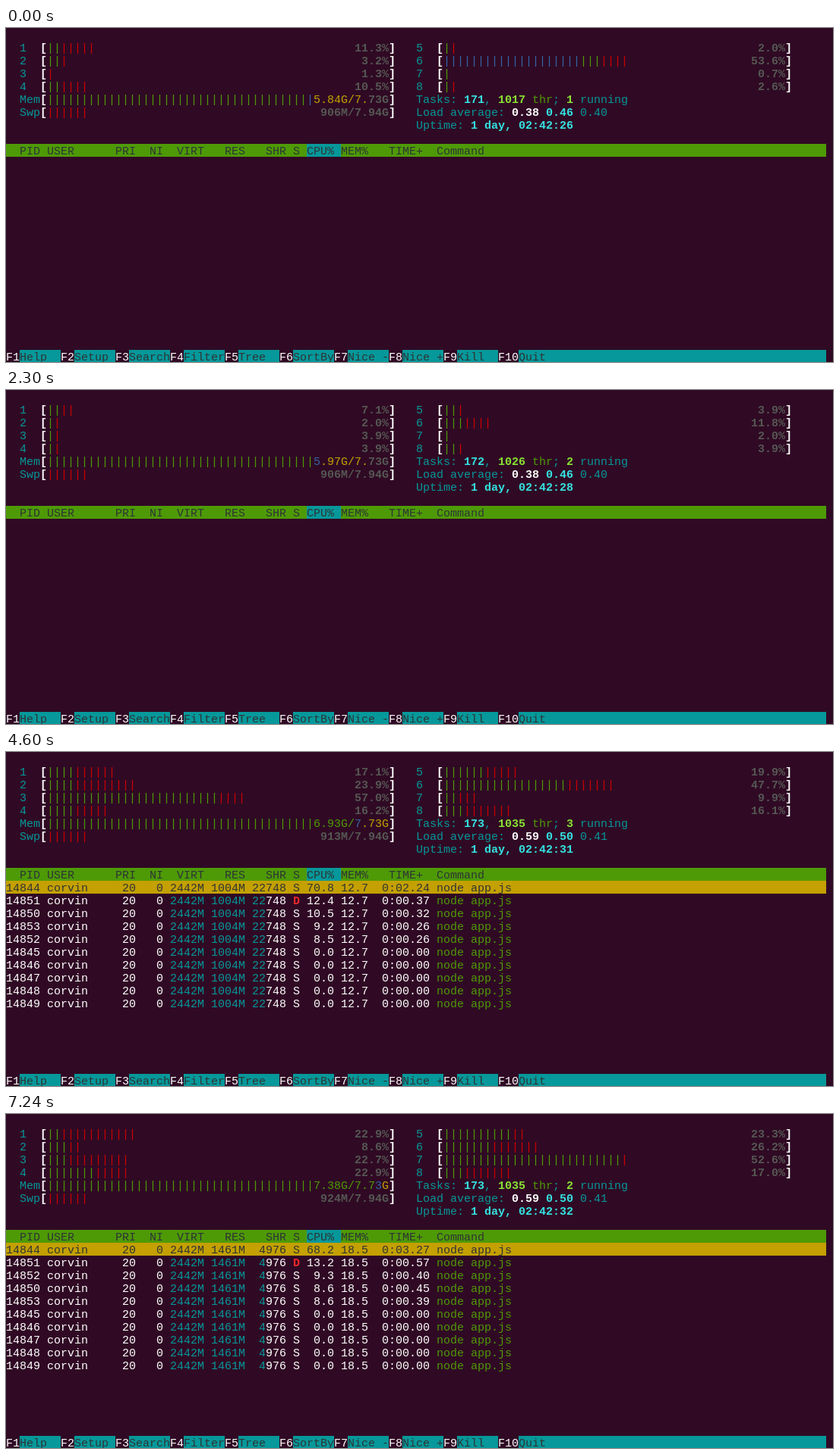
Animation of 1089 by 441 pixels, one loop 8000 ms. Source, as an HTML page:

```html
<!DOCTYPE html>
<html lang="en">
<head>
<meta charset="utf-8">
<title>Process monitor</title>
<style>
  html, body { margin: 0; width: 100%; height: 100%; overflow: hidden; background: #300a24; }
  #screen {
    position: relative; width: 1089px; height: 441px; overflow: hidden; color: #fff;
    font: 15px/0 "Liberation Mono", monospace; letter-spacing: calc(9px - 1ch);
    font-variant-ligatures: none; white-space: pre;
  }
  .t { position: absolute; height: 17px; }
  /* Strut that puts the baseline 14px below the top of the cell. */
  .t::before { content: ""; display: inline-block; height: 14px; }
  .g { color: #4e9a06; }
  .r { color: #c00; }
  .b { color: #3465a4; }
  .y { color: #c4a000; }
  .c { color: #06989a; }
  .dim, .C, .G, .R, .W { font-weight: bold; }
  .dim { color: #555753; }
  .C { color: #34e2e2; }
  .G { color: #8ae234; }
  .R { color: #ef2929; }
  .W { color: #fff; }
  .head, .pick, .key { color: #2e3436; }
  .head { background: #4e9a06; }
  .pick { background: #c4a000; }
  .key { background: #06989a; }
</style>
</head>
<body>
<div id="screen"></div>
<script>
const screen = document.getElementById('screen');
const CELL_W = 9, CELL_H = 17, COLS = 120, METER = 50;

// cpu: [percent, green bars, red bars, blue bars]; mem: [value, green, blue, yellow cells]
const scenes = [
  { until: 1400, mem: ['5.84G', 38, 1, 8], swap: '906M', tasks: [171, 1017, 1],
    load: ['0.38', '0.46', '0.40'], sec: 26,
    cpu: [['11.3', 2, 5], ['3.2', 2, 1], ['1.3', 0, 1], ['10.5', 2, 4],
          ['2.0', 1, 1], ['53.6', 3, 4, 20], ['0.7', 1, 0], ['2.6', 1, 1]] },
  { until: 2900, mem: ['5.97G', 39, 1, 7], swap: '906M', tasks: [172, 1026, 2],
    load: ['0.38', '0.46', '0.40'], sec: 28,
    cpu: [['7.1', 2, 2], ['2.0', 1, 1], ['3.9', 1, 1], ['3.9', 1, 1],
          ['3.9', 2, 1], ['11.8', 3, 4], ['2.0', 1, 0], ['3.9', 2, 1]] },
  { until: 4600, mem: ['6.44G', 42, 1, 7], swap: '906M', tasks: [173, 1034, 4],
    load: ['0.38', '0.46', '0.40'], sec: 29,
    cpu: [['21.9', 5, 7], ['13.0', 3, 4], ['9.3', 3, 3], ['14.5', 4, 4],
          ['9.2', 2, 3, 1], ['48.3', 18, 7], ['8.6', 2, 3], ['8.6', 3, 2]] },
  { until: 6100, mem: ['6.93G', 45, 1, 4], swap: '913M', tasks: [173, 1035, 3],
    load: ['0.59', '0.50', '0.41'], sec: 31,
    cpu: [['17.1', 4, 6], ['23.9', 4, 9], ['57.0', 25, 4], ['16.2', 4, 5],
          ['19.9', 6, 5], ['47.7', 18, 7], ['9.9', 2, 3], ['16.1', 3, 7]],
    res: '1004M', shr: '22748', share: '12.7',
    busy: [[44, '70.8', '2.24'], [51, '12.4', '0.37'], [50, '10.5', '0.32'],
           [53, '9.2', '0.26'], [52, '8.5', '0.26']] },
  { until: 8000, mem: ['7.38G', 48, 1, 1], swap: '924M', tasks: [173, 1035, 2],
    load: ['0.59', '0.50', '0.41'], sec: 32,
    cpu: [['22.9', 2, 11], ['8.6', 3, 2], ['22.7', 3, 9], ['22.9', 7, 5],
          ['23.3', 10, 2], ['26.2', 7, 7], ['52.6', 26, 1], ['17.0', 3, 7]],
    res: '1461M', shr: '4976', share: '18.5',
    busy: [[44, '68.2', '3.27'], [51, '13.2', '0.57'], [52, '9.3', '0.40'],
           [50, '8.6', '0.45'], [53, '8.6', '0.39']] },
];
const idle = [45, 46, 47, 48, 49].map(id => [id, '0.0', '0.00']);
const keys = ['Help', 'Setup', 'Search', 'Filter', 'Tree', 'SortBy', 'Nice -', 'Nice +', 'Kill', 'Quit'];

const span = (cls, text) => `<span class="${cls}">${text}</span>`;
const at = (col, row, html, cls = '') =>
  `<div class="t ${cls}" style="left:${col * CELL_W}px;top:${row * CELL_H}px">${html}</div>`;

// Colours successive runs of cells; parts are [class, cell count].
function paint(cells, parts) {
  let pos = 0;
  return parts.map(([cls, n]) => span(cls, cells.slice(pos, pos += n))).join('');
}

function meter(col, row, label, value, parts) {
  const used = parts.reduce((sum, part) => sum + part[1], 0);
  const room = METER - value.length;
  const cells = '|'.repeat(Math.min(used, room)).padEnd(room) + value;
  return at(col, row, span('c', label.padEnd(3)) + span('W', '[') +
    paint(cells, [...parts, ['dim', METER - used]]) + span('W', ']'));
}

function processRow(scene, [id, cpu, time], i) {
  const { res, share } = scene, shr = scene.shr.padStart(5);
  const state = id === 51 ? span('R', 'D') : 'S';
  const tint = text => i ? span('c', text) : text;
  const command = 'node app.js';
  const line = `148${id} corvin     20   0 ${tint(`2442M ${res} ${shr.slice(0, 2)}`)}${shr.slice(2)} ` +
    `${state} ${cpu.padStart(4)} ${share}  0:0${time} `;
  return i ? at(0, 10 + i, line + span('g', command))
           : at(0, 10, line + command.padEnd(COLS - 63), 'pick');
}

function render(scene) {
  const { mem, swap, tasks, load, sec } = scene;
  let html = scene.cpu.map(([percent, green, red, blue = 0], i) =>
    meter(i < 4 ? 2 : 60, 1 + i % 4, `${i + 1}`, percent + '%',
      [['b', blue], ['g', green], ['r', red]])).join('');
  html += meter(2, 5, 'Mem', mem[0] + '/7.73G', [['g', mem[1]], ['b', mem[2]], ['y', mem[3]]]);
  html += meter(2, 6, 'Swp', swap + '/7.94G', [['r', 6]]);

  html += at(60, 5, 'Tasks: ' + span('C', tasks[0]) + ', ' + span('G', tasks[1]) +
    span('g', ' thr') + '; ' + span('G', tasks[2]) + ' running', 'c');
  html += at(60, 6, 'Load average: ' + span('W', load[0]) + ' ' +
    span('C', load[1]) + ' ' + load[2], 'c');
  html += at(60, 7, 'Uptime: ' + span('C', '1 day, 02:42:' + sec), 'c');

  const titles = '  PID USER      PRI  NI  VIRT   RES   SHR S CPU% MEM%   TIME+  Command';
  html += at(0, 9, titles.padEnd(COLS), 'head') + at(44, 9, 'CPU% ', 'key');
  if (scene.busy) {
    html += [...scene.busy, ...idle].map((task, i) => processRow(scene, task, i)).join('');
  }

  keys.forEach((name, i) => {
    const col = i * 8, key = 'F' + (i + 1), start = col + key.length;
    html += at(col, 25, key) + at(start, 25, name.padEnd(i < 9 ? 6 : COLS - start), 'key');
  });
  screen.innerHTML = html;
}

let shown;
function tick() {
  const time = performance.now() % 8000;
  const scene = scenes.find(s => time < s.until);
  if (scene !== shown) render(shown = scene);
  requestAnimationFrame(tick);
}
tick();
</script>
</body>
</html>
```
